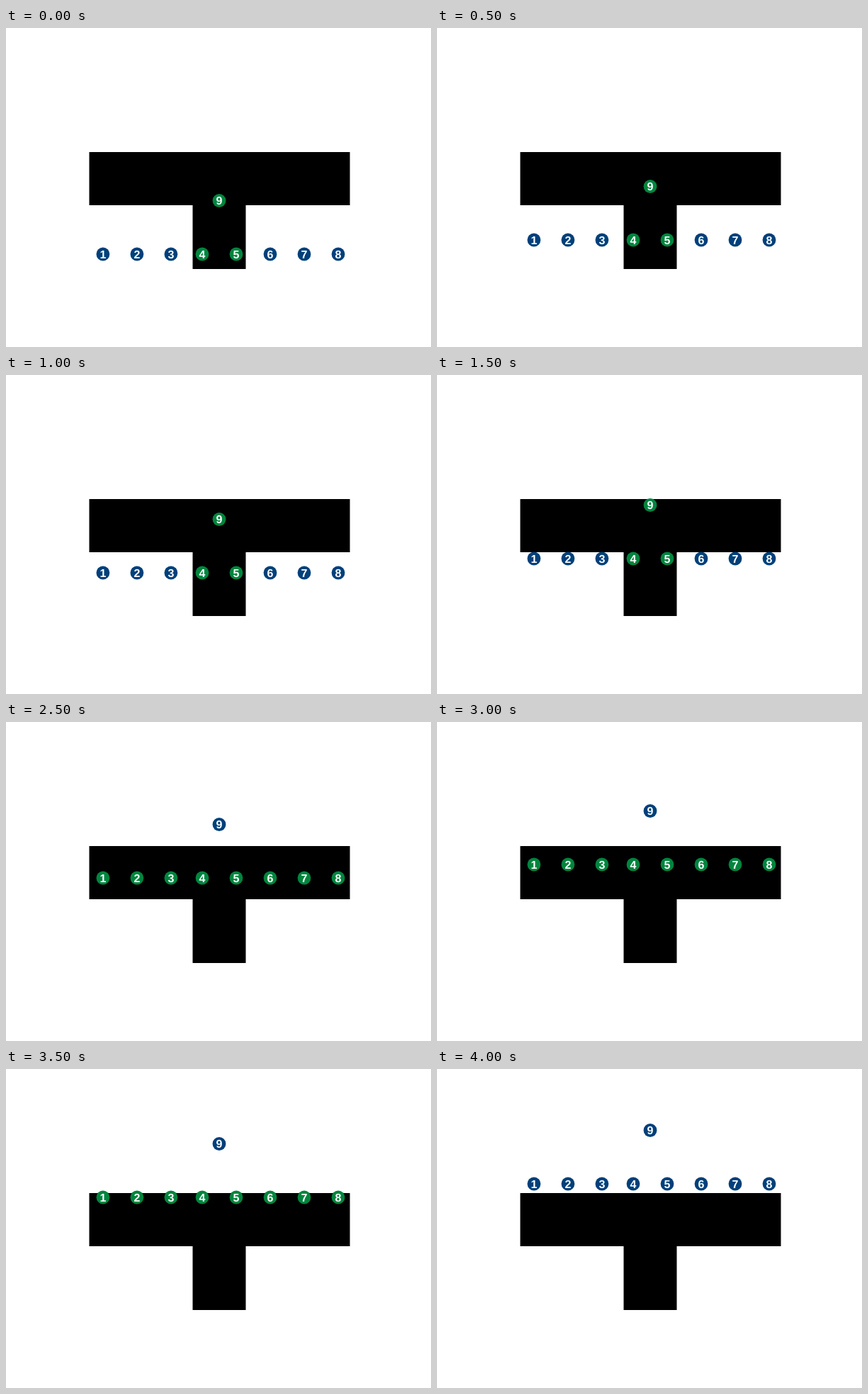
Animation, 600 px wide and 450 px high, one loop 4500 ms. Source, as an HTML page:

```html
<!DOCTYPE html>
<html lang="en">
<head>
<meta charset="utf-8">
<title>Numbered discs crossing a T</title>
<style>
  html, body { margin: 0; width: 100%; height: 100%; overflow: hidden; background: #fff; }
  svg { display: block; width: 600px; height: 450px; }
  text {
    font: bold 16px "Liberation Sans", Arial, sans-serif;
    fill: #fff;
    text-anchor: middle;
    text-rendering: geometricPrecision;
  }
</style>
</head>
<body>
<svg viewBox="0 0 600 450">
  <path d="M117.5 175H485.5V250H338.5V340H263.5V250H117.5Z"/>
  <g id="discs"></g>
</svg>
<script>
  const STEP = 500, STEPS = 9;
  const ROW = 319, GAP = 48;
  const BLUE = '#00407a', GREEN = '#00853e';
  const layer = document.getElementById('discs');
  const discs = [];

  function add(parent, name, attrs) {
    const el = document.createElementNS('http://www.w3.org/2000/svg', name);
    for (const key in attrs) el.setAttribute(key, attrs[key]);
    return parent.appendChild(el);
  }

  function addDisc(x, y) {
    const group = add(layer, 'g', {});
    const circle = add(group, 'circle', { r: 9.4 });
    add(group, 'text', { y: 5.5 }).textContent = discs.length + 1;
    discs.push({ x, y, group, circle });
  }

  // Three discs left of the stem, five from the stem rightwards, one above.
  for (let i = 0; i < 3; i++) addDisc(136.9 + GAP * i, ROW);
  for (let i = 0; i < 5; i++) addDisc(277 + GAP * i, ROW);
  addDisc(301, ROW - 75.5);

  const inBar = (x, y) => x > 118 && x < 486 && y > 175 && y < 250;
  const inStem = (x, y) => x > 264 && x < 339 && y >= 250 && y < 340;

  // The climb slows down slightly towards the top.
  const climb = k => Math.round(20.2 * k - 0.076 * k * k);

  function draw(time) {
    const rise = climb(Math.floor(time / STEP) % STEPS);
    for (const { x, y, group, circle } of discs) {
      const top = y - rise;
      group.setAttribute('transform', `translate(${x} ${top})`);
      circle.setAttribute('fill', inBar(x, top) || inStem(x, top) ? GREEN : BLUE);
    }
  }

  const start = performance.now();
  function tick() {
    draw(performance.now() - start);
    requestAnimationFrame(tick);
  }
  tick();
</script>
</body>
</html>
```
